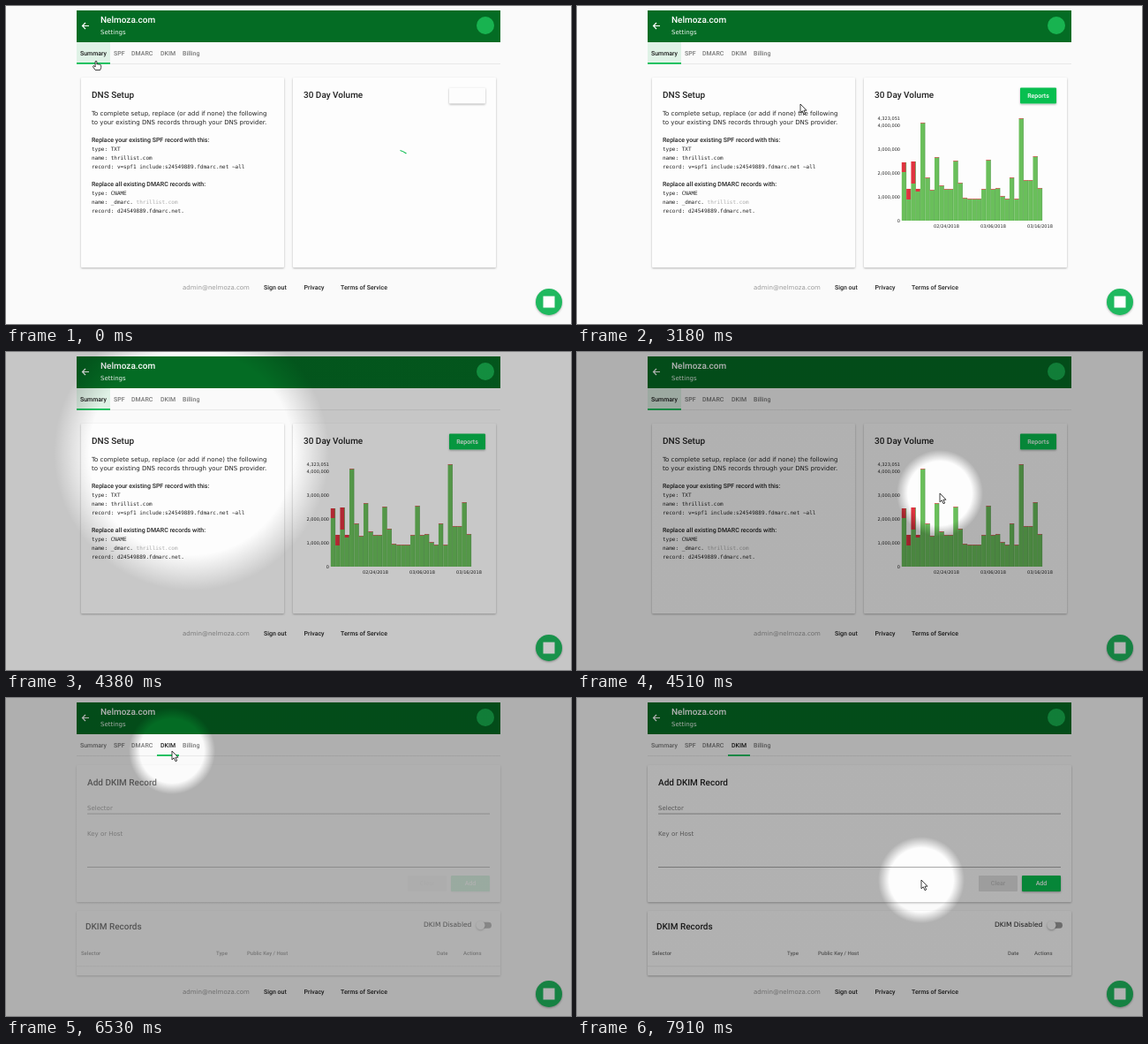
An HTML page for the animation above (8 s loop, 640 px wide and 360 px high).

```html
<!DOCTYPE html>
<html lang="en">
<head>
<meta charset="utf-8">
<title>Settings walkthrough</title>
<style>
  html, body { margin: 0; width: 100%; height: 100%; overflow: hidden; background: #fafafa; }
  svg { display: block; width: 100vw; height: 100vh; }
  text { text-rendering: geometricPrecision; white-space: pre; fill: #222; }
  .title { font: 500 10px Roboto, sans-serif; }
  .strong { font: 500 7px Roboto, sans-serif; }
  .head { font: 500 6px Roboto, sans-serif; fill: #757575; }
  .body { font: 7px "DejaVu Sans", sans-serif; }
  .mono { font: 6px "DejaVu Sans Mono", monospace; }
  .axis { font: 5px "DejaVu Sans", sans-serif; }
  .card { fill: #fdfdfd; filter: drop-shadow(0 1px 1px rgba(0,0,0,.28)); }
  .button { filter: drop-shadow(0 1px 1px rgba(0,0,0,.3)); }
  .mid { text-anchor: middle; }
  .end { text-anchor: end; }
</style>
</head>
<body>
<svg id="stage" viewBox="0 0 640 360"></svg>
<script>
const LOOP = 8000;
const GREEN = '#08bf50';

// Pointer steps: time, x, y, shape
const STEPS = [
  [0, 102, 62, 'hand'], [100, 102, 66, 'hand'], [140, 104, 81, 'arrow'],
  [300, 110, 85, 'arrow'], [430, 117, 89, 'arrow'], [610, 119, 90, 'arrow'],
  [790, 145, 95, 'arrow'], [920, 184, 102, 'arrow'], [1050, 217, 108, 'arrow'],
  [1160, 234, 110, 'arrow'], [1340, 234, 110, ''], [3180, 253, 111, 'arrow'],
  [3600, 253, 111, ''], [4380, 210, 114, ''], [4510, 411, 160, 'arrow'],
  [4710, 350, 137, 'arrow'], [4840, 285, 112, 'arrow'], [4970, 224, 89, 'arrow'],
  [5130, 199, 72, 'arrow'], [5290, 190, 62, 'arrow'], [5420, 185, 54, 'arrow'],
  [5560, 185, 54, 'hand'], [5700, 185, 54, 'hand'], [5860, 185, 54, 'hand'],
  [6380, 185, 54, 'hand'], [6530, 188, 60, 'arrow'], [6660, 194, 69, 'arrow'],
  [6860, 203, 80, 'arrow'], [7030, 218, 94, 'arrow'], [7170, 277, 125, 'arrow'],
  [7330, 280, 126, 'arrow'], [7590, 295, 136, 'arrow'], [7760, 355, 184, 'arrow'],
  [7910, 390, 206, 'arrow']
];

// Bar heights in px, and the rejected share of the first few
const BARS = [66, 36, 67, 36, 111, 49, 35, 72, 40, 36, 36, 68, 43, 26, 25,
              25, 25, 36, 69, 36, 37, 28, 25, 49, 25, 116, 46, 46, 73, 37];
const REJECTED = [11, 12, 25, 3];
const BASE = 243, PITCH = 5.31;

const text = (x, y, cls, str, extra = '') => `<text x="${x}" y="${y}" class="${cls}" ${extra}>${str}</text>`;
const rect = (x, y, w, h, extra) => `<rect x="${x}" y="${y}" width="${w}" height="${h}" ${extra}/>`;
const group = (id, content) => `<g id="${id}">${content}</g>`;
const lines = (x, y, gap, cls, list) => list.map((s, i) => text(x, y + i * gap, cls, s)).join('');
const clamp = v => Math.max(0, Math.min(1, v));

const TABS = [['Summary', 84, 80, 38], ['SPF', 122, 0, 0], ['DMARC', 142, 0, 0], ['DKIM', 175, 171, 25], ['Billing', 200, 0, 0]];

const header =
  rect(80, 5, 480, 36, 'fill="#046c24"') +
  '<path d="M94 22.5H87M90 19l-3.5 3.5L90 26" fill="none" stroke="#fff" stroke-width="1.2"/>' +
  text(107, 18.5, 'title', 'Nelmoza.com', 'style="fill:#fff"') +
  text(107, 32, 'body', 'Settings', 'style="fill:#eef6f0"') +
  '<circle cx="543" cy="22" r="10" fill="#18b350"/>';

const tabs =
  rect(80, 65, 480, .6, 'fill="#ddd"') +
  rect(0, 41, 0, 24.5, 'id="tint" fill="#dff2e6"') +
  rect(0, 64, 0, 1.8, 'id="underline" fill="#10bd54"') +
  TABS.map(([name, x], i) => text(x, 55.5, 'strong', name, `id="tab${i}"`)).join('');

const setupCard =
  rect(85, 81, 230, 215, 'rx="1" class="card"') +
  text(97, 104, 'title', 'DNS Setup') +
  lines(97, 123.5, 10, 'body', ['To complete setup, replace (or add if none) the following', 'to your existing DNS records through your DNS provider.']) +
  text(97, 154, 'strong', 'Replace your existing SPF record with this:') +
  lines(97, 163.5, 10, 'mono', ['type: TXT', 'name: thrillist.com', 'record: v=spf1 include:s24549889.fdmarc.net ~all']) +
  text(97, 204, 'strong', 'Replace all existing DMARC records with:') +
  lines(97, 213.5, 10, 'mono', ['type: CNAME', 'name: _dmarc. <tspan fill="#aaa">thrillist.com</tspan>', 'record: d24549889.fdmarc.net.']);

const axis =
  [['4,323,051', 128.5], ['4,000,000', 137], ['3,000,000', 164], ['2,000,000', 191], ['1,000,000', 218], ['0', 245]]
    .map(([s, y]) => text(366, y, 'axis end', s)).join('') +
  ['02/24/2018', '03/06/2018', '03/16/2018'].map((s, i) => text(418.5 + i * 53, 250.5, 'axis mid', s)).join('');

const bars = BARS.map((h, i) => {
  const x = 367.8 + i * PITCH, red = REJECTED[i] || .8;
  return rect(x, -h, PITCH - .3, red, 'fill="#e0333f"') +
    rect(x, red - h, PITCH - .3, h - red, 'fill="#6abf5b"') +
    rect(x + PITCH - .6, -h, .6, h, 'fill="#4b9a41"');
}).join('');

const volumeCard =
  rect(325, 81, 230, 215, 'rx="1" class="card"') +
  text(337, 104, 'title', '30 Day Volume') +
  rect(502, 92.5, 41, 18, 'rx="1" fill="#fdfdfd" class="button"') +
  group('reports', rect(502, 92.5, 41, 18, `rx="1" fill="${GREEN}"`) + text(522.5, 104, 'strong mid', 'Reports', 'style="fill:#fff"')) +
  '<path id="spinner" d="M446.5 163.5Q450 164.5 453.5 167" fill="none" stroke="#10bd54" stroke-width="1.3"/>' +
  group('axis', axis) + group('bars', bars);

const dkimPage =
  rect(80, 76, 480, 155, 'rx="1" class="card"') +
  text(92, 99, 'title', 'Add DKIM Record') +
  text(92, 127, 'body', 'Selector', 'style="fill:#777"') + rect(92, 130.7, 456, .7, 'fill="#858585"') +
  text(92, 155.5, 'body', 'Key or Host', 'style="fill:#777"') + rect(92, 191.2, 456, .7, 'fill="#858585"') +
  group('formButtons',
    rect(455, 201, 44, 18, 'rx="1" fill="#e0e0e0"') + text(477, 212.3, 'strong mid', 'Clear', 'style="fill:#bdbdbd"') +
    rect(504, 201, 44, 18, `rx="1" fill="${GREEN}" class="button"`) + text(526, 212.3, 'strong mid', 'Add', 'style="fill:#fff"')) +
  rect(80, 241, 480, 73, 'rx="1" class="card"') +
  text(90, 262, 'title', 'DKIM Records') +
  text(473, 259, 'body', 'DKIM Disabled', 'style="font-size:7.5px"') +
  rect(533, 253.7, 17, 7, 'rx="3.5" fill="#9a9a9a"') +
  '<circle cx="537.5" cy="257.2" r="5" fill="#fafafa" class="button"/>' +
  [['Selector', 85], ['Type', 238], ['Public Key / Host', 273], ['Date', 488], ['Actions', 518]]
    .map(([s, x]) => text(x, 291, 'head', s)).join('') +
  rect(80, 303.5, 480, .6, 'fill="#ddd"');

const footer =
  text(200, 320.5, 'body', 'admin@nelmoza.com', 'style="fill:#999"') +
  text(292, 320.5, 'strong', 'Sign out') + text(337.5, 320.5, 'strong', 'Privacy') + text(379, 320.5, 'strong', 'Terms of Service');

const chat =
  '<circle cx="615" cy="335" r="15" fill="#1fb95f" class="button"/>' +
  rect(608.5, 328.5, 13, 13, 'fill="#fff"');

const arrow = '<path d="M0 0V9.8L2.3 7.8L4 11.7L5.7 11L4 7.2H7Z" fill="#fff" stroke="#111" stroke-width=".8" stroke-linejoin="round"/>';
const hand = '<path d="M-.9 .8Q0-.8.9 .8V4Q2 3.2 2.7 4.2Q3.8 3.6 4.3 4.6Q5.6 4.3 5.7 5.6V7.6L4.7 10.5H-.9L-3.6 6.6Q-3.4 5.2-2 5.9L-.9 7Z" fill="#fff" stroke="#111" stroke-width=".8" stroke-linejoin="round"/>';

document.getElementById('stage').innerHTML =
  `<defs><radialGradient id="light" gradientUnits="userSpaceOnUse">
    <stop offset=".74" stop-opacity="0"/><stop offset=".87" stop-opacity=".5"/><stop offset="1"/>
  </radialGradient></defs>` +
  rect(0, 0, 640, 360, 'fill="#fafafa"') + header + tabs +
  group('summaryPage', setupCard + volumeCard) + group('dkimPage', dkimPage) +
  group('footer', footer) + chat +
  rect(0, 0, 640, 360, 'id="shade" fill="url(#light)"') +
  group('arrow', arrow) + group('hand', hand);

const set = (id, attrs) => {
  const el = document.getElementById(id);
  for (const key in attrs) el.setAttribute(key, attrs[key]);
};
const show = (id, on) => set(id, { visibility: on ? 'visible' : 'hidden' });

function render(now) {
  const [t, x, y, pointer] = STEPS.findLast(s => s[0] <= now % LOOP);

  for (const shape of ['arrow', 'hand']) {
    show(shape, pointer === shape);
    set(shape, { transform: `translate(${x} ${y})` });
  }

  const active = t < 5860 ? 0 : 3;
  const [, , left, width] = TABS[active];
  set('underline', { x: left, width });
  set('tint', { x: left, width });
  show('tint', t < 6380);
  TABS.forEach((tab, i) => { document.getElementById('tab' + i).style.fill = i === active ? '#1c1c1c' : '#777'; });

  show('summaryPage', true);
  set('summaryPage', { display: t < 5700 ? 'inline' : 'none' });
  show('spinner', t < 140);
  set('spinner', { transform: `rotate(${t * .5} 450 170)` });
  set('reports', { opacity: clamp((t - 60) / 240) });
  show('axis', t >= 300);
  const grown = 1 - (1 - clamp((t - 260) / 560)) ** 3;
  set('bars', { transform: `translate(0 ${BASE}) scale(1 ${grown})` });

  set('dkimPage', { display: t < 6530 ? 'none' : 'inline', opacity: t < 6660 ? .6 : 1 });
  set('formButtons', { opacity: clamp((t - 6400) / 600) });
  set('footer', { transform: `translate(0 ${t < 6530 ? 0 : 14})` });

  const opening = t < 4510;
  show('shade', t >= 4380);
  set('shade', { opacity: opening ? .21 : .3 });
  set('light', { cx: x, cy: y, r: opening ? 156 : 49 });
}

function tick() {
  render(performance.now() - start);
  requestAnimationFrame(tick);
}
const start = performance.now();
tick();
</script>
</body>
</html>
```
